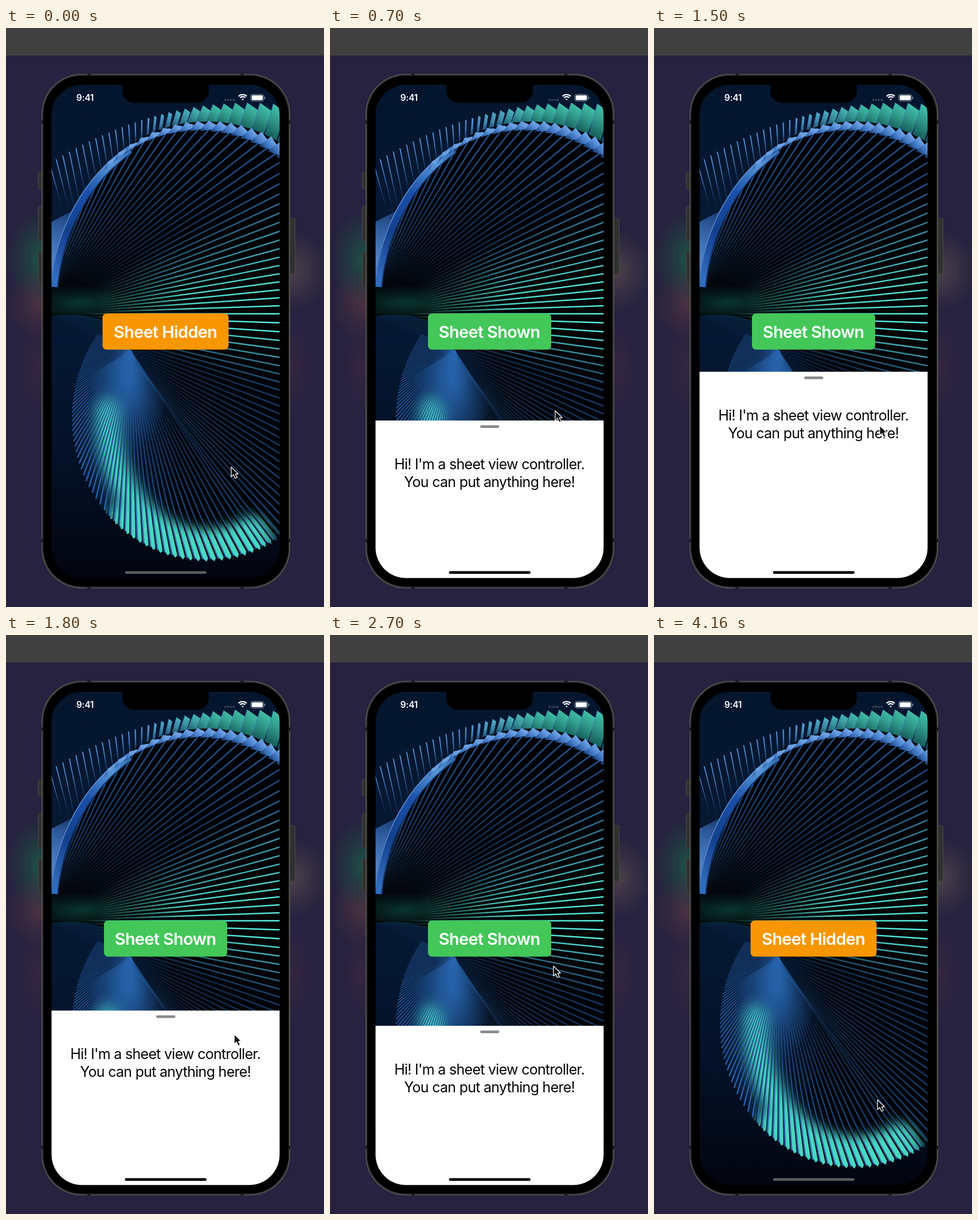
These frames come from a looping animation (555x1009 px, 4320 ms). An HTML page with a canvas:

```html
<!DOCTYPE html>
<html lang="en">
<head>
<meta charset="utf-8">
<title>Sheet demo</title>
<style>
  html, body { margin: 0; width: 100%; height: 100%; overflow: hidden; background: #26223f; }
  canvas { display: block; }
</style>
</head>
<body>
<canvas id="stage" width="555" height="1009"></canvas>
<script>
const W = 555, H = 1009, LOOP = 4320, RAD = Math.PI / 180, STEP = 1.9;
const FONT = 'Inter, "Liberation Sans", sans-serif';
const UPPER = { x: 350, y: 484, rx: 275, ry: 321 };
const LOWER = { x: 350, y: 680, rx: 236, ry: 250 };
const stage = document.getElementById('stage').getContext('2d');

const clamp = (v) => Math.max(0, Math.min(1, v));
const lerp = (a, b, t) => a + (b - a) * t;
const ease = (t) => t * t * (3 - 2 * t);
const mix = (a, b, t) => a.map((v, i) => lerp(v, b[i], t));
const rgba = (c, a = 1) => `rgba(${c.map(Math.round).join()},${a})`;

function layer(paint) {
  const c = document.createElement('canvas');
  c.width = W; c.height = H;
  paint(c.getContext('2d'));
  return c;
}

function rounded(c, x, y, w, h, r, fill) {
  c.beginPath();
  c.roundRect(x, y, w, h, r);
  if (fill) { c.fillStyle = fill; c.fill(); }
}

function polygon(c, points, fill) {
  c.beginPath();
  points.forEach((p) => c.lineTo(...p));
  c.closePath();
  c.fillStyle = fill;
  c.fill();
}

function gradient(c, from, to, stops) {
  const g = c.createLinearGradient(...from, ...to);
  stops.forEach(([at, color]) => g.addColorStop(at, color));
  return g;
}

function glow(c, x, y, rx, ry, color, alpha) {
  c.save();
  c.translate(x, y);
  c.scale(rx, ry);
  const g = c.createRadialGradient(0, 0, 0, 0, 0, 1);
  g.addColorStop(0, rgba(color, alpha));
  g.addColorStop(.5, rgba(color, alpha * .45));
  g.addColorStop(1, rgba(color, 0));
  c.fillStyle = g;
  c.fillRect(-1, -1, 2, 2);
  c.restore();
}

function label(c, text, x, y, size, weight, color, tracking) {
  c.font = `${weight} ${size}px ${FONT}`;
  c.letterSpacing = tracking + 'px';
  c.textAlign = 'center';
  c.fillStyle = color;
  c.fillText(text, x + tracking / 2, y);
}

// Blades fan out from a moving root to the far side of an ellipse.
function root(a) {
  const t = clamp(a / 57);
  return [lerp(60, 218, t), lerp(498, 562, t)];
}

function reach(a) {
  const e = a < 0 ? UPPER : LOWER, [ox, oy] = root(a);
  const px = (ox - e.x) / e.rx, py = (oy - e.y) / e.ry;
  const dx = Math.cos(a * RAD) / e.rx, dy = Math.sin(a * RAD) / e.ry;
  const A = dx * dx + dy * dy, B = px * dx + py * dy, C = px * px + py * py - 1;
  return (-B + Math.sqrt(Math.max(0, B * B - A * C))) / A;
}

function at(a, part = 1) {
  const [x, y] = root(a), r = reach(a) * part;
  return [x + r * Math.cos(a * RAD), y + r * Math.sin(a * RAD)];
}

function rimPoints(from, to, part) {
  const points = [];
  for (let a = from; a <= to; a += STEP) points.push(at(a, part));
  return points;
}

const upperEdge = (x, e = UPPER) =>
  e.y - e.ry * Math.sqrt(Math.max(0, 1 - ((x - e.x) / e.rx) ** 2));

function blade(c, a) {
  const cool = a < 0 ? clamp((-a - 8) / 22) : clamp((a - 4) / 14);
  const color = mix([92, 246, 230], [40, 100, 174], cool);
  const dense = clamp((a - 55) / 35);
  const dim = a > 0 ? lerp(1, .7, cool * (1 - dense)) : lerp(1, .85, cool);
  c.strokeStyle = gradient(c, root(a), at(a), [
    [0, rgba(color, dense * .5)],
    [.18, rgba(color, .05 + dense * .4)],
    [.45, rgba(color, lerp(.85, .5, cool) * dim)],
    [1, rgba(color, dim)]]);
  c.lineWidth = Math.min(2.5, reach(a) * STEP * RAD * .3);
  c.beginPath();
  c.moveTo(...root(a));
  c.lineTo(...at(a, .99));
  c.stroke();
}

function backBlades(c) {
  let gap;
  for (let x = 75; x < 490; x += gap) {
    const y = 130 + .00088 * (x - 420) ** 2;
    const warm = clamp((x - 235) / 125);
    gap = lerp(11.5, 23, clamp((x - 250) / 180));
    const footX = x + lerp(22, -16, clamp((x - 86) / 250));
    const foot = [footX, Math.min(upperEdge(footX) + 8, 312)];
    const wide = lerp(2.2, gap * .9, warm);
    const light = mix([92, 150, 218], [74, 214, 184], warm);
    const dark = mix([32, 82, 150], [12, 72, 74], warm);
    polygon(c, [[x, y], [x + wide, y + wide * .7], [foot[0] + wide, foot[1] + 6], foot],
      gradient(c, [x + wide, y], foot, [[0, rgba(light)], [.45, rgba(mix(light, dark, .35), .95)], [1, rgba(dark, lerp(.25, 1, warm))]]));
    c.strokeStyle = `rgba(61,126,178,${warm * .8})`;
    c.lineWidth = 1.2;
    c.beginPath(); c.moveTo(x, y); c.lineTo(...foot); c.stroke();
  }
}

function ribbon(c, inset, width, fill) {
  c.strokeStyle = fill;
  c.lineWidth = width;
  c.beginPath();
  c.ellipse(UPPER.x, UPPER.y, UPPER.rx - inset, UPPER.ry - inset, 0, 186 * RAD, 240 * RAD);
  c.stroke();
}

function upperFan(c) {
  polygon(c, [[79, 338], [136, 308], [112, 370], [79, 445]],
    gradient(c, [120, 310], [80, 420], [[0, '#12305f'], [.4, '#315d9f'], [1, '#5d8dd4']]));
  c.fillStyle = '#010205';
  c.beginPath();
  c.ellipse(UPPER.x, UPPER.y, UPPER.rx, UPPER.ry, 0, Math.PI, 2 * Math.PI);
  c.lineTo(480, 600);
  c.lineTo(218, 566);
  c.quadraticCurveTo(190, 487, 79, 502);
  c.fill();
  glow(c, 130, 478, 110, 30, [9, 78, 62], .6);
  for (let a = 0; a > -70; a -= STEP) blade(c, a);

  ribbon(c, 7, 12, gradient(c, [80, 430], [215, 210],
    [[0, '#326bbb'], [.3, '#12408d'], [.6, '#1b4fa9'], [.85, '#5795d6'], [1, '#2f66ad']]));
  ribbon(c, 1, 1.6, '#5b91dc');
  ribbon(c, 14, 1.4, '#123a7c');
  for (let a = -66; a < -33; a += STEP) {
    const t = clamp((a + 66) / 30), inner = at(a, .95);
    polygon(c, [at(a, 1.005), at(a + STEP * lerp(1.3, 2.1, t), .972), inner],
      gradient(c, at(a), inner, [[0, '#6a9fe2'], [.5, '#3d74c0'], [1, '#123061']]));
  }
}

function tealArc(c, scaleX, scaleY, from, to, width) {
  c.lineWidth = width;
  c.beginPath();
  c.ellipse(LOWER.x, LOWER.y, LOWER.rx * scaleX, LOWER.ry * scaleY, 0, from * RAD, to * RAD);
  c.stroke();
}

function lowerFan(c) {
  polygon(c, [...rimPoints(8, 204, .97), [218, 562]],
    gradient(c, [115, 690], [300, 690], [[0, '#061a38'], [.5, '#051630'], [1, '#010408']]));
  c.save();
  polygon(c, [[218, 562], ...rimPoints(56, 150, .97)], 'transparent');
  c.clip();
  glow(c, 214, 612, 70, 135, [38, 104, 178], .9);
  c.restore();

  c.save();
  c.beginPath();
  for (let a = 41.8; a < 130; a += STEP) {
    const half = STEP * .36;
    [root(a), at(a - half, .985), at(a), at(a + half, .98)]
      .forEach((p, i) => i ? c.lineTo(...p) : c.moveTo(...p));
  }
  c.clip();
  c.filter = 'blur(11px)';
  c.lineCap = 'round';
  c.strokeStyle = '#49d8c4';
  tealArc(c, .73, .87, 62, 184, 44);
  tealArc(c, .9, .95, 66, 132, 62);
  c.restore();

  for (let a = STEP; a < 206; a += STEP) blade(c, a + (a > 50 ? STEP * .36 : 0));
}

const wallpaper = layer((c) => {
  c.fillStyle = gradient(c, [0, 99], [0, 958],
    [[0, '#04162e'], [.25, '#061832'], [.52, '#051833'], [.75, '#041127'], [1, '#020510']]);
  c.fillRect(79, 99, 400, 860);
  backBlades(c);
  upperFan(c);
  lowerFan(c);
});

const backdrop = layer((c) => {
  c.fillStyle = '#26223f';
  c.fillRect(0, 0, W, H);
  glow(c, 60, 402, 58, 85, [25, 100, 72], .7);
  glow(c, 58, 482, 60, 62, [104, 60, 66], .55);
  glow(c, 500, 423, 62, 72, [98, 80, 80], .65);
  [58, 498].forEach((x) => glow(c, x, 590, 42, 95, [70, 42, 70], .45));
  c.fillStyle = '#404040';
  c.fillRect(0, 0, W, 48);

  [[56.5, 252, 28], [56.5, 311, 60], [56.5, 390, 59], [495, 332, 97]].forEach(([x, y, h]) => {
    rounded(c, x, y, x < 100 ? 7 : 9.5, h, 2, '#30302f');
    c.strokeStyle = '#484745';
    c.lineWidth = 1;
    c.stroke();
  });
  ['#555450', '#292927', '#000'].forEach((fill, i) => {
    const d = i * 1.6;
    rounded(c, 62 + d, 80 + d, 434 - 2 * d, 896.5 - 2 * d, 70 - d, fill);
  });
  c.fillStyle = '#171716';
  [145, 412].forEach((x) => [80, 972.5].forEach((y) => c.fillRect(x - 3, y, 6, 4)));
  [164, 893].forEach((y) => [62, 492.5].forEach((x) => c.fillRect(x, y - 3, 3.5, 6)));
});

const statusBar = layer((c) => {
  rounded(c, 203, 90, 151, 40.5, [0, 0, 21, 21], '#000');
  label(c, '9:41', 138, 127, 15.5, 600, '#fff', -.2);
  for (let i = 0; i < 4; i++) rounded(c, 381 + i * 4.8, 123.5, 3.6, 3.6, 1.8, '#3c4c60');
  c.strokeStyle = '#fff';
  c.lineWidth = 2.2;
  [1.6, 6.3, 10].forEach((r) => {
    c.beginPath(); c.arc(413, 126, r, -135 * RAD, -45 * RAD); c.stroke();
  });
  rounded(c, 427, 115.7, 23, 11.7, 3.5);
  c.strokeStyle = '#8290a3';
  c.lineWidth = 1;
  c.stroke();
  rounded(c, 428.7, 117.3, 19.6, 8.5, 2, '#fff');
  rounded(c, 451.3, 119.7, 1.4, 4, .7, '#8290a3');
});

// Gesture key points: time, sheet top, pointer x, pointer y.
const GESTURE = [[0, 962, 393, 765], [700, 684, 393, 667], [1500, 599, 394, 693],
  [2200, 740, 405, 700], [2700, 681, 390, 577], [3200, 918.5, 391, 809], [3400, 962, 390, 810]];

function pose(t) {
  const next = GESTURE.findIndex((key) => key[0] > t);
  if (next < 0) return GESTURE[GESTURE.length - 1];
  const a = GESTURE[next - 1], b = GESTURE[next];
  return mix(a, b, ease((t - a[0]) / (b[0] - a[0])));
}

function button(c, shown) {
  const w = shown ? 215 : 220;
  rounded(c, 278.5 - w / 2, 497.5, w, 63, 7, shown ? '#43c759' : '#f89600');
  label(c, shown ? 'Sheet Shown' : 'Sheet Hidden', 278.5, 539.5, 29, 600, '#fff', -.7);
}

function sheet(c, top) {
  c.fillStyle = '#fff';
  c.fillRect(79, top, 400, 960 - top);
  rounded(c, 262, top + 8.3, 33.5, 4.6, 2.3, '#8b8b8f');
  ["Hi! I'm a sheet view controller.", 'You can put anything here!'].forEach((line, i) =>
    label(c, line, 278.5, top + 84.5 + i * 31.5, 25, 400, '#050505', -.72));
}

function pointer(c, x, y, pressed) {
  if (pressed) {
    c.beginPath();
    c.arc(x - 2, y - 2, 19, 0, 7);
    c.fillStyle = 'rgba(194,194,194,.88)';
    c.fill();
  }
  c.save();
  c.translate(x, y);
  c.lineJoin = 'round';
  polygon(c, [[0, 0], [0, 17], [4, 13.5], [7, 20], [10.3, 18.5], [7.4, 12.5], [12.3, 12]], '#080a0d');
  c.strokeStyle = '#f4f4f4';
  c.lineWidth = 1.3;
  c.stroke();
  c.restore();
}

function draw(now) {
  const ms = now % LOOP;
  const t = ms < 4160 ? Math.min(4000, Math.floor(ms / 100) * 100) : 4160;
  const [, top, x, y] = pose(t);
  const c = stage;
  c.drawImage(backdrop, 0, 0);
  c.save();
  rounded(c, 79.5, 99, 398, 859.5, 53);
  c.clip();
  c.drawImage(wallpaper, 0, 0);
  button(c, top < 880);
  if (top < 958) sheet(c, top);
  rounded(c, 207.5, 946.5, 142.5, 4.8, 2.4, top < 940 ? '#000' : '#5b5b5e');
  c.restore();
  c.drawImage(statusBar, 0, 0);
  pointer(c, x, y, Math.abs(t - 2150) < 250 || Math.abs(t - 2950) < 150);
}

function tick() {
  draw(performance.now());
  requestAnimationFrame(tick);
}
tick();
</script>
</body>
</html>
```
